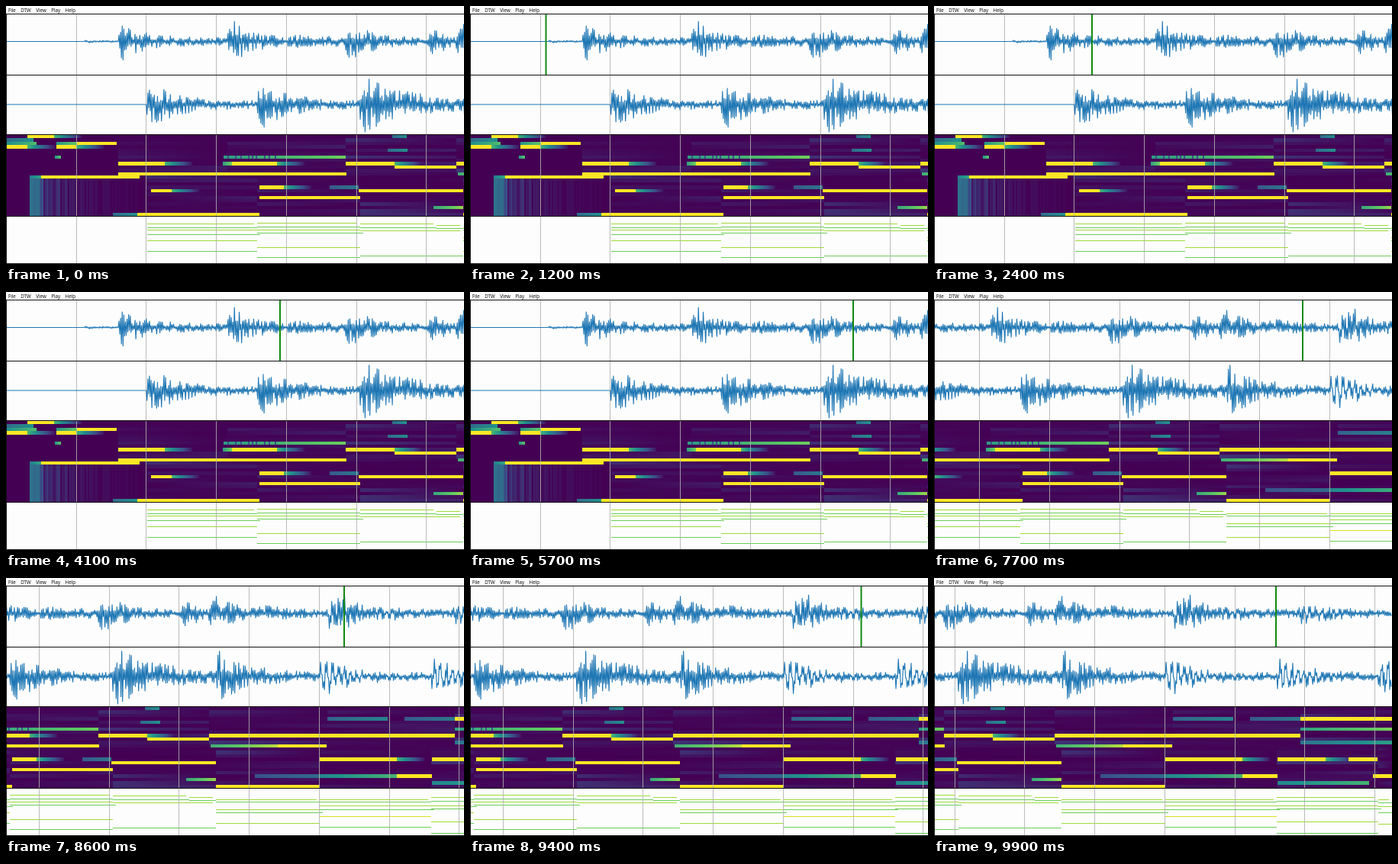
An HTML page with a canvas for the animation above (10 s loop, 600x338 px).

```html
<!DOCTYPE html>
<html lang="en">
<head>
<meta charset="utf-8">
<title>Audio alignment viewer</title>
<style>
  html, body { margin: 0; width: 100%; height: 100%; overflow: hidden; background: #fdfdfd; }
  #stage { position: relative; width: 600px; height: 338px; overflow: hidden; background: #fdfdfd; }
  #menu { position: absolute; left: 3px; top: 1px; display: flex; gap: 6.5px; font: 500 6.2px/9px "Open Sans", "Noto Sans", sans-serif; color: #000; }
  #world { position: absolute; left: 0; top: 0; width: 1032px; height: 338px; animation: scroll 10s step-end infinite; }
  canvas { display: block; }
  #cursor { position: absolute; left: -1px; top: 11px; width: 2px; height: 79px; background: #128a12; animation: play 10s infinite; }
  .line { position: absolute; left: 0; width: 600px; height: 1px; background: #111; }
  #edge { position: absolute; left: 0; top: 10px; width: 1px; height: 328px; background: #111; }

  /* The view jumps by 108 px whenever the playhead passes 90 % of its width */
  @keyframes scroll {
    0% { transform: translateX(0); }
    61% { transform: translateX(-108px); }
    72% { transform: translateX(-216px); }
    85% { transform: translateX(-324px); }
    98%, 100% { transform: translateX(-432px); }
  }
  /* The playhead moves once per 100 ms */
  @keyframes play {
    0% { transform: translateX(-5px); animation-timing-function: step-end; }
    1% { transform: translateX(1px); animation-timing-function: steps(23); }
    24% { transform: translateX(207px); animation-timing-function: steps(33); }
    57% { transform: translateX(502px); animation-timing-function: steps(8); }
    65% { transform: translateX(588px); animation-timing-function: steps(12); }
    77% { transform: translateX(699px); animation-timing-function: steps(9); }
    86% { transform: translateX(767px); animation-timing-function: steps(13); }
    99%, 100% { transform: translateX(880px); animation-timing-function: step-end; }
  }
</style>
</head>
<body>
<div id="stage">
  <div id="world">
    <canvas id="view" width="1032" height="338"></canvas>
    <div id="cursor"></div>
  </div>
  <div id="menu"><span>File</span><span>DTW</span><span>View</span><span>Play</span><span>Help</span></div>
  <div class="line" style="top:10px"></div>
  <div class="line" style="top:90px"></div>
  <div class="line" style="top:168px"></div>
  <div class="line" style="top:275px"></div>
  <div class="line" style="top:337px"></div>
  <div id="edge"></div>
</div>
<script>
const W = 1032;
const ctx = document.getElementById('view').getContext('2d');

function seeded(s) {
  return () => {
    s = (s * 1664525 + 1013904223) >>> 0;
    return s / 4294967296;
  };
}

const mix = (a, b, k) => a + (b - a) * k;

// Onsets of the two recordings
const upperOnsets = [147, 290, 445, 590, 745, 912];
const lowerOnsets = [184, 329, 464, 599, 735, 881, 1014];

// ---- Waveforms: every hit [x, size, decay] dies away exponentially into a noise floor
function wave(mid, hits, lead, tone, seed) {
  const rnd = seeded(seed);
  const start = hits[0][0];
  let side = 1;
  ctx.beginPath();
  ctx.moveTo(0, mid);
  for (let x = 0; x < W; x += 1.05) {
    side = -side;
    let ring = 0;
    for (const [at, size, decay] of hits)
      if (x >= at) ring = Math.max(ring, size * Math.min(1, 0.4 + (x - at) / 10) * Math.exp((at - x) / decay));
    const floor = x > start ? 4.5 : x > lead ? 1.5 : 0;
    const noise = side * (0.15 + Math.pow(rnd(), 1.4));
    const hum = x > 734 ? tone : 0;
    const body = hum * Math.sin((x - 734) * 0.8) + (1 - hum) * noise;
    ctx.lineTo(x, mid - floor * noise - ring * body);
  }
  ctx.strokeStyle = '#1f77b4';
  ctx.lineWidth = 1.15;
  ctx.lineJoin = 'round';
  ctx.stroke();
}

const upperHits = [
  [147, 22, 28], [290, 28, 25], [376, 5, 40], [445, 26, 27], [553, 18, 20],
  [590, 22, 28], [655, 7, 30], [745, 32, 40], [910, 15, 34]
];
const lowerHits = lowerOnsets.map((x, i) => [x, 26 + (i % 4) * 2.2, i === 2 ? 58 : 36]);

// ---- Chroma maps: two stacks of 12 rows in viridis colours
const TOP = 169, ROW = 4.42;
const viridis = [[68, 1, 84], [59, 82, 139], [33, 145, 140], [94, 201, 98], [253, 231, 37]];
function colour(v) {
  const p = Math.min(1, Math.max(0, v)) * 4, i = Math.min(3, Math.floor(p));
  return `rgb(${viridis[i].map((c, n) => Math.round(mix(c, viridis[i + 1][n], p - i)))})`;
}

function bar(row, x0, x1, v0, v1 = v0) {
  const y = Math.round(TOP + row * ROW), h = Math.round(TOP + (row + 1) * ROW) - y;
  for (let x = x0; x < x1; x++) {
    ctx.fillStyle = colour(mix(v0, v1, (x - x0) / (x1 - x0)));
    ctx.fillRect(x, y, 1, h);
  }
}

// Full-strength notes [row, from, to]; rows 12 and up belong to the lower map
const strong = [
  [0, 28, 63], [3, 0, 28], [3, 66, 92], [2, 93, 145], [8, 147, 208], [11, 147, 446],
  [8, 296, 355], [8, 445, 509], [9, 509, 590], [8, 590, 912], [11, 680, 744], [3, 912, W],
  [12, 46, 175], [23, 172, 332], [16, 190, 217], [15, 332, 364], [18, 332, 464], [16, 462, 599],
  [23, 599, 735], [15, 735, 836], [20, 836, 882], [15, 882, 945], [15, 975, 1013], [20, 1007, W]
];
// Weak notes swell up to a peak [row, from, to, peak]
const weak = [
  [1, 0, 36, .5], [2, 0, 40, .7], [2, 66, 93, .75], [6, 64, 72, .75], [6, 285, 445, .78],
  [8, 284, 296, .8], [0, 506, 525, .5], [4, 500, 526, .5], [11, 592, 680, .9],
  [3, 745, 824, .45], [3, 846, 912, .4], [6, 912, W, .8], [10, 912, W, .55],
  [12, 31, 46, .6], [23, 140, 172, .5], [15, 424, 462, .4], [21, 560, 599, .85],
  [20, 650, 735, .35], [20, 735, 836, .65], [22, 882, 1002, .65]
];

// Faint texture that changes at each onset
function haze(first, onsets, rnd) {
  const cuts = [...onsets, W];
  for (let i = 1; i < cuts.length; i++)
    for (let row = first; row < first + 12; row++)
      bar(row, cuts[i - 1], cuts[i], Math.pow(rnd(), 4) * 0.16, Math.pow(rnd(), 4) * 0.1);
}

function chroma() {
  const rnd = seeded(77);
  const ends = [...upperOnsets, ...lowerOnsets];
  ctx.fillStyle = colour(0);
  ctx.fillRect(0, TOP, W, 106);
  haze(0, upperOnsets, rnd);
  haze(12, lowerOnsets, rnd);
  for (let x = 31; x < 172; x += 2) {
    ctx.fillStyle = colour(x < 48 ? 0.2 + rnd() * 0.2 : rnd() * 0.25 * Math.exp((48 - x) / 45));
    ctx.fillRect(x, 226, 2, 49);
  }
  // Unless an onset cuts it off, a note fades out
  for (const [row, , to] of strong)
    if (!ends.some(x => Math.abs(x - to) < 10)) bar(row, to, to + 36, .65, .05);
  for (const [row, from, to, peak] of weak) bar(row, from, to, peak * 0.7, peak);
  for (const [row, from, to] of strong) bar(row, from, to, 1);
  for (let x = 290; x < 355; x += 4 + Math.floor(rnd() * 8)) bar(6, x, x + 2, .25);
}

// ---- Score: chords as [start, end, ...heights]
const chords = [
  [185, 329, 285, 290, 293, 299, 307, 321], [329, 464, 284, 289, 293, 297, 316, 329],
  [464, 564, 285, 290], [464, 599, 294, 327], [564, 599, 287, 291],
  [599, 735, 290, 293, 303, 307, 321], [735, 881, 290, 293, 298, 303, 312, 326],
  [881, 1014, 287, 292, 298, 302, 319, 334], [1014, W, 290, 294, 299, 307, 322]
];
function score() {
  for (const [start, end, ...notes] of chords)
    notes.forEach((y, i) => {
      const drift = i === 0 ? -4 : i === 3 ? 4 : 0;
      ctx.fillStyle = y === 312 ? '#dce319' : i % 2 ? '#6ccd5a' : '#a0da39';
      ctx.fillRect(start, y, end + drift - start, 1);
    });
}

function grid() {
  ctx.fillStyle = 'rgba(176,176,176,.85)';
  for (let k = 1; k * 91.73 < W; k++) ctx.fillRect(Math.round(k * 91.73), 11, 1, 326);
}

chroma();
score();
grid();
wave(46.5, upperHits, 103, 0.4, 21);
wave(129, lowerHits, 184, 0.6, 43);
</script>
</body>
</html>
```
